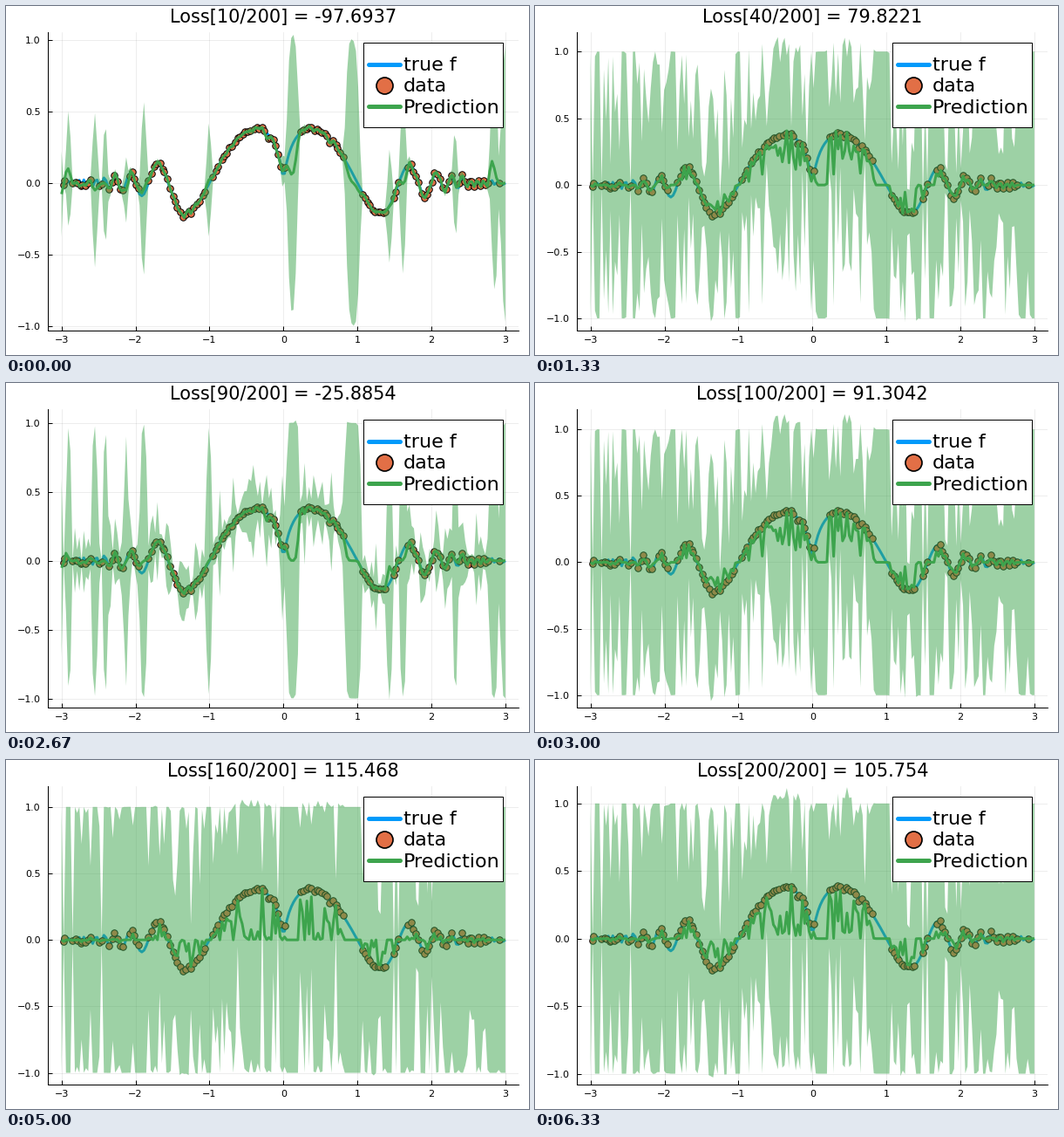
A matplotlib script that plays this animation: 600x400 px, repeating every 6660 ms.

```python
import numpy as np
import matplotlib.pyplot as plt
from matplotlib.animation import FuncAnimation
from matplotlib.patches import Polygon, Rectangle

W, H, DPI = 600, 400, 100
PT = 72 / DPI                      # one pixel in points
BLUE, ORANGE, GREEN = "#009afa", "#e26f46", "#3da44d"
TOP, BOTTOM, LEFT, RIGHT = 30.3, 371.5, 48.4, 588.2
NOISE = 0.01
FRAMES, COUNT = 20, 200

plt.rcParams["font.family"] = "DejaVu Sans"

# Training inputs and length scales are measured in steps of the test grid.
grid = np.arange(COUNT)
x_test = np.linspace(-3, 3, COUNT)
rng = np.random.default_rng(4)


def to_x(step):
    return -3 + step * 6 / (COUNT - 1)


def truth(x):
    return np.sinc(np.abs(x) ** np.abs(x))


def scatter_span(first, last):
    """Jittered points from first to last, with both ends kept."""
    steps = np.linspace(first, last, int(np.ceil((last - first) / 1.25)) + 1)
    steps[1:-1] += rng.uniform(-0.4, 0.4, len(steps[1:-1]))
    return steps


# Stretches of the x axis that hold data; the gaps between stay uncertain.
spans = [(1, 1.3), (5, 12.9), (16.8, 18), (21.4, 27.4), (30.5, 34.5),
         (38.9, 64.2), (67.9, 98.3), (100.3, 100.3), (107.1, 126.3),
         (134.9, 145.2), (149, 151), (155.3, 174.8), (178.3, 191.3),
         (196.3, 196.3)]
t_train = np.concatenate([scatter_span(*span) for span in spans])
y_train = truth(to_x(t_train)) + NOISE * rng.standard_normal(len(t_train))

# Training history: iteration, length scale, loss, lower and upper y limit
keys = np.array([
    (10, 1.60, -97.6937, -1.030, 1.052),
    (20, 1.75, -108.421, -1.030, 1.040),
    (30, 0.36, 88.4003, -1.091, 1.141),
    (70, 0.56, 54.0877, -1.078, 1.150),
    (80, 2.30, -131.627, -0.920, 0.920),
    (90, 0.95, -25.8854, -1.063, 1.098),
    (100, 0.36, 91.3042, -1.090, 1.150),
    (120, 0.15, 118.463, -1.093, 1.176),
    (160, 0.17, 115.468, -1.085, 1.154),
    (200, 0.24, 105.754, -1.077, 1.126),
])


def state(iteration):
    return [np.interp(iteration, keys[:, 0], col) for col in keys.T[1:]]


def kernel(a, b, scale):
    return np.exp(-0.5 * ((a[:, None] - b[None, :]) / scale) ** 2)


def predict(scale):
    gram = kernel(t_train, t_train, scale) + NOISE ** 2 * np.eye(len(t_train))
    cross = kernel(t_train, grid, scale)
    weights = np.linalg.solve(gram, cross)
    var = 1 - np.sum(cross * weights, axis=0)
    return weights.T @ y_train, np.sqrt(np.clip(var, 0, None))


def place(left):
    ax.set_position([left / W, 1 - BOTTOM / H,
                     (RIGHT - left) / W, (BOTTOM - TOP) / H])


def label(value, digits):
    return f"{value:.{digits}f}".replace("-", "\u2212")


fig = plt.figure(figsize=(W / DPI, H / DPI), dpi=DPI, facecolor="white")
ax = fig.add_axes([0, 0, 1, 1])
place(LEFT)
ax.set_xlim(-3.18, 3.18)
ax.set_axisbelow(True)
ax.grid(color="black", alpha=0.1, lw=0.5)
ax.spines[["top", "right"]].set_visible(False)
ax.spines[["left", "bottom"]].set_linewidth(PT)
ax.tick_params(direction="in", length=5 * PT, width=PT, labelsize=8)
ax.tick_params(axis="y", pad=8.5 * PT)
ax.tick_params(axis="x", pad=15 * PT)
ticks = range(-3, 4)
ax.set_xticks(ticks, [label(t, 0) for t in ticks], va="baseline")

line = dict(solid_joinstyle="round", solid_capstyle="butt")
dots = dict(ls="", marker="o", mfc=ORANGE, mec="black")
ax.plot(x_test, truth(x_test), color=BLUE, lw=3 * PT, zorder=2, **line)
ax.plot(to_x(t_train), y_train, ms=7.5 * PT, mew=PT, zorder=3, **dots)
band = ax.add_patch(Polygon([(0, 0), (0, 1), (1, 1)], fc=GREEN, alpha=0.5,
                            lw=0, zorder=4))
mean_line, = ax.plot([], [], color=GREEN, lw=3 * PT, zorder=5, **line)

# Title and legend in pixel coordinates
over = fig.add_axes([0, 0, 1, 1], zorder=5)
over.set(xlim=(0, W), ylim=(H, 0))
over.axis("off")
title = over.text(318.3, 18.5, "", size=15, ha="center", va="baseline")
over.add_patch(Rectangle((410, 42), 160, 97, fc="white", ec="black", lw=PT))
for y, color in ((66.5, BLUE), (115, GREEN)):
    over.plot([416, 452], [y, y], color=color, lw=5 * PT,
              solid_capstyle="round")
over.plot([433.8], [90.8], ms=19 * PT, mew=1.7 * PT, **dots)
for row, text in enumerate(("true f", "data", "Prediction")):
    over.text(456, 74.2 + 24.3 * row, text, size=16, va="baseline")


def update(i):
    iteration = 10 * (i + 1)
    scale, loss, bottom, top = state(iteration)
    mean, std = predict(scale)
    band.set_xy(np.column_stack([np.append(x_test, x_test[::-1]),
                                 np.append(mean - std, (mean + std)[::-1])]))
    mean_line.set_data(x_test, mean)

    # A short range gets finer ticks, whose wider labels push the axis right.
    fine = top - bottom < 2
    gap, digits = (0.25, 2) if fine else (0.5, 1)
    values = [k * gap for k in range(-6, 7) if bottom <= k * gap <= top]
    ax.set_yticks(values, [label(v, digits) for v in values])
    ax.set_ylim(bottom, top)
    place(LEFT + 7 if fine else LEFT)
    title.set_text(f"Loss[{iteration}/200] = {loss:.6g}")
    return band, mean_line, title


anim = FuncAnimation(fig, update, frames=FRAMES, interval=333,
                     init_func=lambda: update(0), repeat=True, repeat_delay=0)
plt.show()
```
